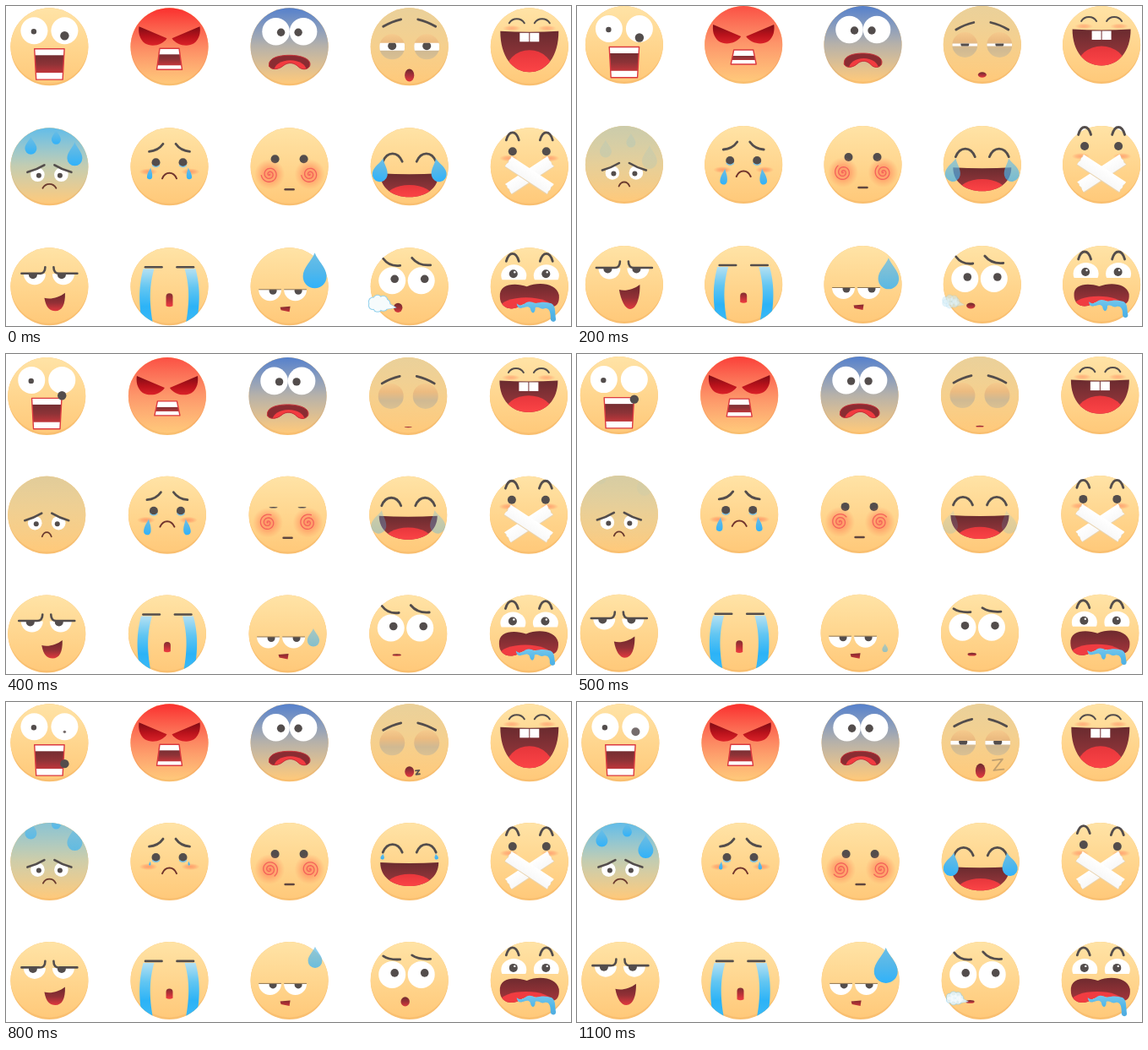
An HTML page with a canvas that plays this animation: 669 px wide and 379 px high, repeating every 1.2 s.

```html
<!DOCTYPE html>
<html lang="en">
<head>
<meta charset="utf-8">
<title>Emoji grid</title>
<style>
html, body { margin: 0; width: 100%; height: 100%; overflow: hidden; background: #fff; }
canvas { display: block; width: 669px; height: 379px; }
</style>
</head>
<body>
<canvas id="stage"></canvas>
<script>
const canvas = document.getElementById('stage');
const g = canvas.getContext('2d');
const dpr = window.devicePixelRatio || 1;
canvas.width = 669 * dpr;
canvas.height = 379 * dpr;

const INK = '#534d4c', RED = '#dc3a40', TAU = Math.PI * 2;
const DISC = 'M-46,0A46,46 0 1 1 46,0A46,46 0 1 1 -46,0Z';
let now = 0; // current step, 0 to 11, 100 ms each

// Timing rules, all from 0 to 1
const ramp = (a, b) => Math.min(1, Math.max(0, (now - a) / (b - a)));
const bump = (a, b, c, d) => ramp(a, b) * (1 - ramp(c, d));
const wave = (period, peak = 0) => .5 + .5 * Math.cos(TAU * (now - peak) / period);

function vgrad(y0, y1, ...colors) {
  const grad = g.createLinearGradient(0, y0, 0, y1);
  colors.forEach((c, i) => grad.addColorStop(i / (colors.length - 1), c));
  return grad;
}

function fill(d, style) {
  g.fillStyle = style;
  g.fill(new Path2D(d));
}

function line(d, width = 3, color = INK) {
  g.strokeStyle = color;
  g.lineWidth = width;
  g.stroke(new Path2D(d));
}

function oval(x, y, rx, ry, style) {
  g.fillStyle = style;
  g.beginPath();
  g.ellipse(x, y, rx, ry, 0, 0, TAU);
  g.fill();
}

const dot = (x, y, r, style = INK) => oval(x, y, r, r, style);

function group(fn, x = 0, y = 0, angle = 0, sx = 1, sy = sx) {
  g.save();
  g.translate(x, y);
  g.rotate(angle);
  g.scale(sx, sy);
  fn();
  g.restore();
}

function clipped(d, fn) {
  g.save();
  g.clip(new Path2D(d));
  fn();
  g.restore();
}

function pair(fn) {
  fn();
  group(fn, 0, 0, 0, -1, 1);
}

function glow(x, y, rx, ry, alpha) {
  group(() => {
    const grad = g.createRadialGradient(0, 0, 0, 0, 0, 1);
    grad.addColorStop(0, `rgba(255,105,75,${alpha})`);
    grad.addColorStop(.5, `rgba(255,115,78,${alpha * .7})`);
    grad.addColorStop(1, 'rgba(255,130,80,0)');
    dot(0, 0, 1, grad);
  }, x, y, 0, rx, ry);
}

function drop(x, y, w, h, alpha = 1, angle = 0) {
  if (w < .5 || alpha <= 0) return;
  group(() => {
    const r = w / 2, cy = h / 2 - r;
    g.globalAlpha = alpha;
    g.beginPath();
    g.moveTo(0, -h / 2);
    g.bezierCurveTo(w * .12, -h * .28, r, -h * .08, r, cy);
    g.arc(0, cy, r, 0, Math.PI);
    g.bezierCurveTo(-r, -h * .08, -w * .12, -h * .28, 0, -h / 2);
    g.fillStyle = vgrad(-h / 2, h / 2, '#6cbfe6', '#53b7ea', '#30b2fa');
    g.fill();
  }, x, y, angle);
}

function head() {
  dot(0, 0, 46, '#f9bf70');
  clipped(DISC, () => dot(0, -3, 46.5, vgrad(-46, 44, '#ffe3a6', '#ffd68f', '#ffc97a')));
}

function tint(rgb, alpha, mid) {
  const c = a => `rgba(${rgb},${a * alpha})`;
  dot(0, 0, 46, vgrad(-46, 44, c(1), c(mid), c(0)));
}

function toothMouth(topW, top, botW, bottom, upper, lower) {
  const d = `M${-topW},${top}H${topW}L${botW},${bottom}H${-botW}Z`;
  clipped(d, () => {
    fill('M-30,-10H30V50H-30Z', vgrad(top, bottom, '#642a2e', '#8d3337', '#e8393e'));
    g.fillStyle = '#fff';
    g.fillRect(-30, top, 60, upper);
    g.fillRect(-30, bottom - lower, 60, lower);
  });
  line(d, 1.4, RED);
}

function grin(w, top, bottom) {
  const h = bottom - top;
  const d = `M${-w},${top}Q0,${top + 2} ${w},${top}C${w},${top + h * .62} ${w * .58},${bottom} 0,${bottom}C${-w * .58},${bottom} ${-w},${top + h * .62} ${-w},${top}Z`;
  fill(d, vgrad(top, bottom, '#6a2b2f', '#a2393e'));
  clipped(d, () => oval(0, bottom + 2, w * .84, h * .58, vgrad(top + h * .4, bottom, '#e4343a', '#fb4446')));
}

const arch = (x, y, w, h) => `M${x - w},${y}C${x - w * .55},${y - h * 1.33} ${x + w * .55},${y - h * 1.33} ${x + w},${y}`;

function shocked() {
  const fall = -13 + 1.45 * now + .41 * now * now;
  pair(() => dot(-18, -19, 16, '#fff'));
  dot(-18.5, -18, 3.2);
  dot(18, -13, 5 * ramp(6.5, 11), '#756c6c');
  toothMouth(17.7, 2.5, 15.7, 38.8, 7.5, 8);
  clipped(DISC, () => dot(18, fall, 5.2));
}

function angry() {
  const calm = bump(0, 2, 4, 6);
  tint('250,48,46', 1 - .18 * calm, .47);
  pair(() => fill('M-36,-24L-3,-10C-8,-2 -21,1 -29,-4C-36,-9 -37,-18 -36,-24Z',
    vgrad(-24, 0, '#7d0c15', '#b8121b', '#e0242b')));
  toothMouth(11.5, 2 + 4 * calm, 15, 27 - 4 * calm, 7, 5);
}

function scared() {
  tint('85,128,204', 1, .43);
  for (const x of [-16, 16.5]) dot(x, -18, 16.3, '#fff');
  for (const x of [-10, 10.5]) dot(x, -17, 4.7);
  group(() => {
    const d = 'M-24,23C-26,13 -12,10 0,10C13,10 27,14 24,23C21,28 14,27 11,24C6,19 -1,17 -8,23C-13,27 -22,28 -24,23Z';
    fill(d, '#8a2c32');
    clipped(d, () => oval(1, 28, 19, 12, '#f23b40'));
    line(d, 1, '#c83138');
  }, 0, 0, 0, .92 + .08 * wave(4), 1);
}

function sleepy() {
  const open = 1 - bump(0, 3, 10, 12), gap = 4.5 * open;
  tint('190,170,130', .33, .45);
  const by = -15 - 9 * open;
  pair(() => line(`M-31,${by}Q-21,${by - 6} -10,${by - 8.5}`, 2.8));
  for (const x of [-20.5, 20.5]) group(() => {
    dot(0, 0, 15, vgrad(-15, 15, '#f5ca8d', '#ecbb80', '#d0b992', '#dbc192'));
    if (gap > 0) clipped(DISC, () => clipped(`M-15,${-gap}H15V${gap}H-15Z`, () => {
      dot(0, 0, 15, '#fff');
      dot(0, -1, 5);
    }));
  }, x);
  const ry = 4.8 + 4.2 * Math.cos(TAU * (now - 10.3) / 12), y = 37 - ry * .45;
  oval(0, y, 4.5 + ry * .15, ry, vgrad(y - ry, y + ry, '#6b2a2e', '#a8303a', '#e4383d'));
  const z = ramp(7, 11);
  if (z > 0) group(() => {
    g.globalAlpha = 1.15 - .8 * z;
    line('M-.5,-.5H.5L-.5,.5H.5', 1.8 / (2 + 10 * z));
  }, 6 + 15 * z, 38 - 12 * z, -.12, 2 + 10 * z);
}

function toothy() {
  const top = -18.5;
  pair(() => {
    glow(-21, -22, 11, 3.5, .4);
    line(arch(-15, -28, 9, 5), 2);
  });
  grin(34.5, top, 30 - 11 * bump(0, 4, 4, 8));
  g.fillStyle = '#fff';
  for (const x of [-11.5, .5]) g.fillRect(x, top + 2, 11, 10.5);
}

function coldSweat() {
  const cold = 1 - bump(0, 3, 4, 9) + ramp(4, 9) * 0;
  const chill = now < 4 ? cold : ramp(4, 9);
  tint('98,188,232', chill, .38);
  tint('205,188,145', .6 * (1 - chill), .45);
  const slide = 3 * (now < 5 ? now : now - 12);
  clipped(DISC, () => {
    drop(-22, -25 + slide, 14, 21, chill ** 2);
    drop(8, -35 + slide, 11, 17, chill ** 2);
    drop(30, -15 + slide, 18, 28, chill ** 2);
  });
  pair(() => {
    clipped('M-27,7Q-15,4 -5,-2V30H-27Z', () => dot(-14, 9.5, 8.3, '#fff'));
    dot(-12.5, 10.5, 3);
    line('M-26,6.5Q-15,3.5 -6,-2', 2.6);
  });
  line(arch(0, 25.5, 5.5 + 2.5 * chill, 5), 1.8, '#6a3a2e');
}

function crying() {
  const flow = wave(12, 3), size = 1.1 * Math.sqrt(flow);
  pair(() => {
    glow(-25, 6, 11, 4, .5);
    line('M-24,-18C-17,-18.5 -11,-22 -7.5,-27', 2.8);
    dot(-16, -5, 5);
    line('M-20,-1.5Q-16,2 -12,-1.5', 1.4, '#7cc3e6');
    drop(-23, 1 + 14 * flow, 8 * size, 18 * size, 1, .12);
  });
  line(arch(0, 14, 8.5, 6.5), 2, '#70342d');
}

function dizzy() {
  const open = 1 - .86 * bump(3, 4, 4, 5);
  pair(() => oval(-17, -9, 5, 5 * open, INK));
  for (const x of [-23.5, 24]) group(() => {
    glow(0, 0, 18, 18, .6);
    g.rotate(now / 12 * TAU);
    g.beginPath();
    for (let t = 0; t < 2.5; t += .04) g.lineTo(Math.cos(t * TAU) * t * 4, Math.sin(t * TAU) * t * 4);
    g.strokeStyle = '#f4625a';
    g.lineWidth = 1.3;
    g.stroke();
  }, x, 9);
  line('M-5,27H5', 2.5, '#5f463f');
}

function joyful() {
  const lift = bump(0, 3, 8, 12), top = 8 - 7 * lift;
  pair(() => line(arch(-20, -6 - 5 * lift, 11.5, 9.5), 2.8));
  grin(34.5, top, top + 28);
  const fading = now < 6, grow = ramp(7, 11);
  const s = fading ? 1 : grow, y = fading ? 4 + now : -9 + 12 * grow;
  pair(() => drop(-31 - 3 * s, y, 18 * s, 28 * s, fading ? 1 - ramp(0, 6) : 1, .2));
}

function taped() {
  const first = bump(0, 2, 2, 4), second = bump(8, 10, 10, 12);
  for (const [side, hop] of [[-1, first + second], [1, first]]) {
    const y = -4 * hop, x = 20 * side;
    glow(24.5 * side, -10, 11, 4, .45);
    line(arch(x, -31.5 + y, 7.5, 9), 2.8);
    dot(x, -18 + y, 5);
  }
  for (const a of [-.58, .58]) group(() => {
    fill('M-30,-6H30V8H-30Z', '#ead4b0');
    fill('M-30,-7L-29,-4L-30,-2L-29,1L-30,4V7H30L29,4L30,1L29,-2L30,-5V-7Z', vgrad(-7, 7, '#fff', '#f8f8f8'));
  }, 0, 10, a);
}

function smirking() {
  const beat = wave(4), top = 6 + 7.5 * beat;
  group(() => {
    for (const x of [-17.5, 16.5]) group(() => clipped('M-14,0H14V15H-14Z', () => {
      dot(0, 0, 13, '#fff');
      dot(-2, 1, 5);
    }), x);
    pair(() => line('M-33,-.5L-12,-.5Q-5,0 -5,-8', 2.6));
  }, 0, -19.5 + 4.5 * beat);
  fill(`M-6,${top}C1,${top + 2} 11,${top} 18.5,${top - 6}C19,${top + 8} 15,29 7,29C1,29 -4,${top + 12} -6,${top}Z`,
    vgrad(top - 5, 30, '#6e282d', '#933036', '#e8393e'));
}

function weeping() {
  pair(() => {
    clipped(DISC, () => fill('M-31,-21H-18C-23,-4 -25,16 -19,46H-32C-37,16 -36,-2 -31,-21Z',
      vgrad(-21, 46, '#b4e0f2', '#62c6f2', '#2cb3f7', '#3cbaf6')));
    line('M-28.5,-23H-9', 2.6);
  });
  const gape = wave(6), y = 10 - 2 * gape, b = 20 + 3 * gape;
  fill(`M-4,${y + 4}Q-4,${y} 0,${y}Q4,${y} 4,${y + 4}V${b}Q0,${b + 2} -4,${b}Z`,
    vgrad(y, b, '#812f32', '#b53036', '#ea3a3f'));
}

function awkward() {
  for (const x of [-23, 7]) group(() => {
    clipped('M-15,0H15V15H-15Z', () => {
      dot(0, 0, 13.5, '#fff');
      dot(3.5, 1.5, 4.5);
    });
    line('M-13,0H13', 1, '#8f7450');
  }, x, 3.5);
  fill('M-11,24.5L1,23.5L0,30L-10,28Z', vgrad(23, 30, '#7c2a2e', '#c93438'));
  // slides down and shrinks, then a new one swells at the brow
  const grow = ramp(5, 10), down = now < 6 && !grow;
  const w = down ? 28 - .85 * now * now : 28 * grow;
  drop(30 + .5 * wave(6, 3), down ? -19 + 1.45 * now * now : -42 + 24 * grow,
    w, w * 1.5, down ? 1 - .1 * now : .3 + .7 * grow);
}

function cloud(x, y, s, alpha) {
  if (alpha <= 0) return;
  group(() => {
    g.globalAlpha = alpha;
    for (const [grow, color] of [[1, '#8fcfec'], [0, '#f6fbfc']]) {
      for (let i = 0; i < 7; i++) {
        const a = i / 7 * TAU;
        dot(-4 + 8 * Math.cos(a), 5 * Math.sin(a), 4.6 + grow, color);
      }
      fill(`M2,${-3 - grow}L${16 + grow},5L2,${7 + grow}Z`, color);
      dot(-4, 0, 5, color);
    }
  }, x, y, 0, s);
}

function puffing() {
  const lift = 8 - 8 * bump(4, 6, 6, 10);
  line(`M-31,${-25 - lift}Q-24,${-25 + lift * .2} -11,-25`, 2.8);
  line(`M3,${-26 - lift}Q11,${-25 + lift * .1} 25,-25.5`, 2.8);
  for (const x of [-20.5, 14]) dot(x, -7, 16, '#fff');
  for (const x of [-17.5, 18]) dot(x, -9, 4.8);
  const ry = 1.2 + 4.4 * wave(8);
  oval(-13.5 + 8.5 * bump(4, 6, 8, 11.5), 25, 5.2, ry, vgrad(25 - ry, 25 + ry, '#702c2f', '#9c3035', '#d93a3d'));
  const blow = ramp(8.5, 12);
  if (now < 4) cloud(-32 - now, 20, 1 - .1 * now, 1 - ramp(0, 3));
  else cloud(-18 - 13 * blow, 21, .3 + .7 * blow, blow);
}

function drooling() {
  pair(() => line(arch(-20, -30, 7.5, 9), 2.8));
  for (const x of [-18.5, 20]) group(() => {
    clipped('M-16,-16H16V5H-16Z', () => oval(0, 0, 15, 13, '#fff'));
    dot(-.5, -2, 5);
    dot(1, -4, 1.2, '#fff');
  }, x, -13);
  const squeeze = bump(0, 2, 2, 4);
  group(() => {
    const d = 'M-35,12C-36,-3 -18,-5 -3,0C11,-6 32,-4 35,10C36,22 30,26 22,23C9,18 -5,17 -13,24C-23,29 -35,25 -35,12Z';
    fill(d, vgrad(-4, 22, '#6c2a2e', '#a0343a'));
    clipped(d, () => oval(-4, 25, 31, 12, '#f03c41'));
  }, 0, 2 * squeeze, 0, 1 - .07 * squeeze, 1 - .1 * squeeze);
  const end = 37.5 + 5 * wave(12, 10.5);
  fill(`M-15,20C-12,23 -9,23 -4,19C0,17 3,18 7,20C14,18 20,18 26,20C31,23 30,28 31,${end - 5}C33,${end + 1.5} 24,${end + 1.5} 25,${end - 5}C25,28 22,25 18,26C14,28 11,23 7,25C7,33 2,33 1,26C-2,22 -5,25 -8,25C-12,27 -15,24 -15,20Z`,
    vgrad(18, 44, '#74c6ec', '#50b6e9', '#52a9dc'));
}

const faces = [
  shocked, angry, scared, sleepy, toothy,
  coldSweat, crying, dizzy, joyful, taped,
  smirking, weeping, awkward, puffing, drooling
];

function draw() {
  g.setTransform(dpr, 0, 0, dpr, 0, 0);
  g.fillStyle = '#fff';
  g.fillRect(0, 0, 669, 379);
  g.lineCap = 'round';
  g.lineJoin = 'round';
  // the whole grid swings right, then left, then settles
  const sway = bump(0, 2, 2, 3.2) - .7 * bump(3, 4, 4, 6);
  const x0 = 51.4 + 4.5 * sway, dx = 142.1 - .8 * sway;
  const y0 = 48.3 - 2.3 * sway, dy = 140.8 + 1.2 * (1 - ramp(2, 4));
  faces.forEach((face, i) => group(() => {
    head();
    face();
  }, x0 + dx * (i % 5), y0 + dy * Math.floor(i / 5)));
}

const start = performance.now();
function tick() {
  now = Math.floor((performance.now() - start) % 1200 / 100);
  draw();
  requestAnimationFrame(tick);
}
tick();
</script>
</body>
</html>
```
